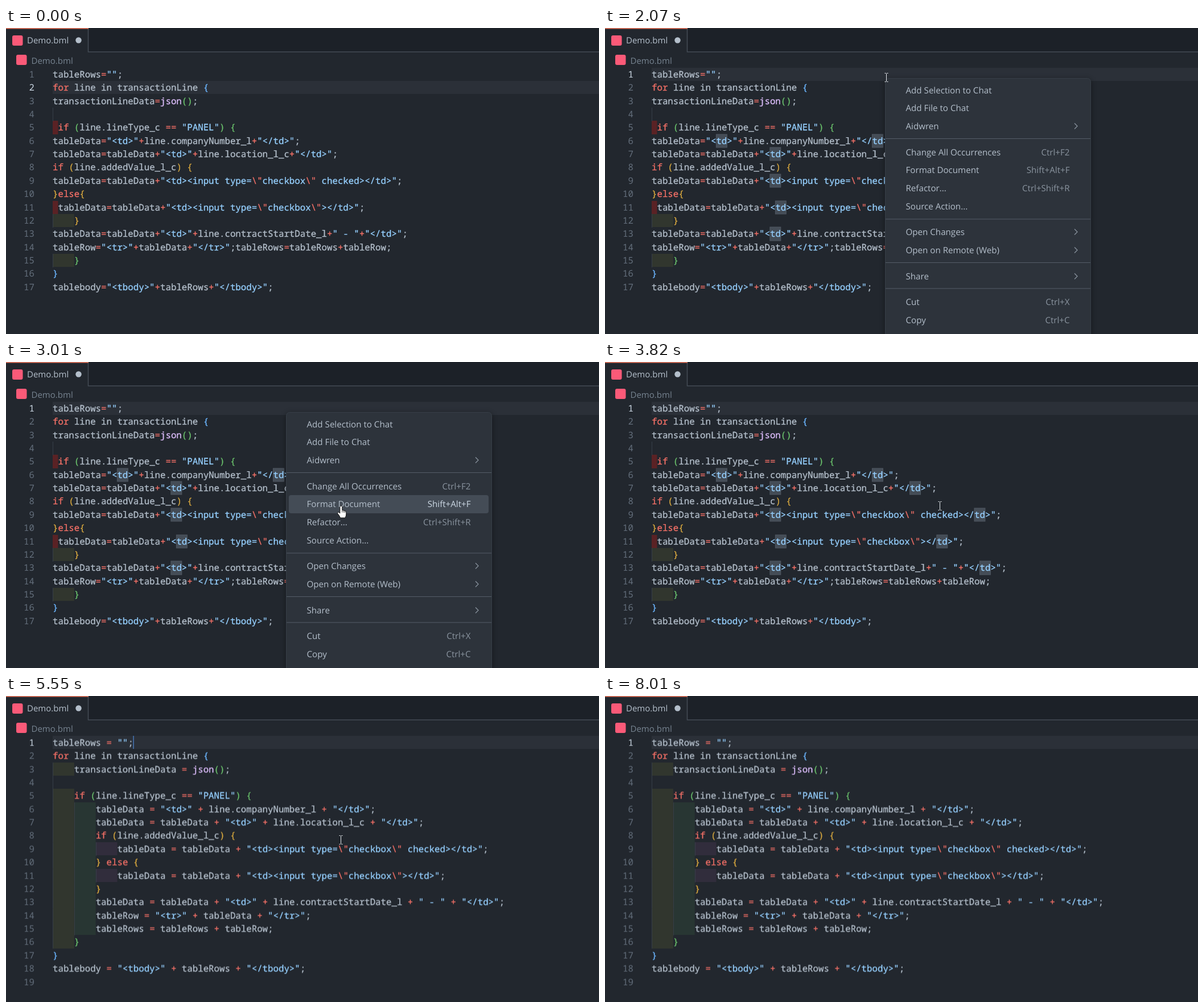
Animation, 1042 px wide and 538 px high, one loop 8.15 s. Source, as an HTML page:

```html
<!DOCTYPE html>
<html lang="en">
<head>
<meta charset="utf-8">
<title>Formatting a document</title>
<style>
html, body { margin: 0; width: 100%; height: 100%; overflow: hidden; background: #22272e; }
svg { display: block; width: 1042px; height: 538px; font: 15px "Open Sans", "Noto Sans", sans-serif; text-rendering: geometricPrecision; }
text { white-space: pre; fill: #b4bfcb; }
.code text { font: 15.75px "Noto Sans Mono", monospace; }
.code .num { fill: #636e7b; text-anchor: end; }
.code .active { fill: #cdd9e5; }
.line { color: #b4bfcb; }
.line, .line tspan { fill: currentColor; stroke: currentColor; stroke-width: .3px; }
.key { color: #f47067; }
.str { color: #96d0ff; }
.fn { color: #dcbdfb; }
.b0 { color: #6cb6ff; }
.b1 { color: #6bc46d; }
.b2 { color: #daaa3f; }
.current { fill: rgba(99,110,123,.14); }
.guide { fill: #373e47; }
.word { fill: #444c56; stroke: #505963; }
.tone0 { fill: rgba(255,255,64,.07); }
.tone1 { fill: rgba(127,255,127,.07); }
.tone2 { fill: rgba(255,127,255,.07); }
.bad { fill: rgba(128,32,32,.6); }
#menu { filter: drop-shadow(0 2px 5px rgba(0,0,0,.4)); }
#menu text { font-size: 15.15px; }
#menu .keys { fill: #8a949f; text-anchor: end; }

/* every track shares one clock; hard switches hold until the next key */
.t { animation: 8.15s step-end infinite both; }
#raw { animation-name: raw; }
#fmt { animation-name: fmt; }
#first { animation-name: first; }
#second { animation-name: second; }
#raw .n1 { animation-name: n1; }
#raw .n2 { animation-name: n2; }
#words { animation-name: words; }
#early { animation-name: early; }
#late { animation-name: late; }
#menu { animation-name: menu; }
#hover { animation-name: hover; }
#lit { animation-name: lit; }
#beam { animation-name: beam; }
#hand { animation-name: hand; }
#click { animation-name: click; }
#settle { animation-name: settle; animation-timing-function: ease-out; }
#caret { animation-name: caret; animation-timing-function: linear; }
#mouse { animation-name: mouse; animation-timing-function: linear; }

@keyframes raw { 0% { opacity: 1 } 47.67%, 100% { opacity: 0 } }
@keyframes fmt { 0% { opacity: 0 } 47.67%, 100% { opacity: 1 } }
@keyframes first { 0% { opacity: 0 } 23.8%, 100% { opacity: 1 } }
@keyframes second { 0% { opacity: 1 } 23.8%, 100% { opacity: 0 } }
@keyframes n1 { 0% { fill: #636e7b } 23.8%, 100% { fill: #cdd9e5 } }
@keyframes n2 { 0% { fill: #cdd9e5 } 23.8%, 100% { fill: #636e7b } }
@keyframes words { 0% { opacity: 0 } 24.6%, 100% { opacity: 1 } }
@keyframes early { 0% { opacity: 1 } 57.4%, 100% { opacity: 0 } }
@keyframes late { 0% { opacity: 0 } 57.4%, 100% { opacity: 1 } }
@keyframes menu { 0% { opacity: 0 } 24.6% { opacity: 1 } 46.87%, 100% { opacity: 0 } }
@keyframes hover {
  0% { opacity: 0; transform: translateY(94px) }
  29.4% { opacity: 1; transform: translateY(94px) }
  30.1% { opacity: 1; transform: translateY(125.5px) }
  30.81% { opacity: 1; transform: translateY(156.5px) }
  33.5% { opacity: 1; transform: translateY(203px) }
  35.78%, 100% { opacity: 1; transform: translateY(234px) }
}
@keyframes lit { 0% { fill: #8a949f } 35.78%, 100% { fill: #cdd9e5 } }
@keyframes beam { 0% { opacity: 0 } 1.6% { opacity: 1 } 29.4% { opacity: 0 } 46.87% { opacity: 1 } 76.1%, 100% { opacity: 0 } }
@keyframes hand { 0% { opacity: 0 } 29.4% { opacity: 1 } 46.87%, 100% { opacity: 0 } }
@keyframes click { 0% { opacity: 0 } 23.8% { opacity: 1 } 24.6% { opacity: 0 } 44.17% { opacity: 1 } 46.87%, 100% { opacity: 0 } }
@keyframes settle { 0%, 47.67% { transform: translateY(3.5px) } 49.94%, 100% { transform: none } }
@keyframes caret {
  0%, 62.2% { opacity: 1 } 64.4%, 66.9% { opacity: 0 }
  69.3%, 74.5% { opacity: 1 } 76.9%, 79.5% { opacity: 0 }
  82%, 87% { opacity: 1 } 89.3%, 91.9% { opacity: 0 }
  94.2%, 97.3% { opacity: 1 } 98.2%, 100% { opacity: 0 }
}
@keyframes mouse {
  0%, 1.6% { transform: translate(662px,496px) }
  11.41% { transform: translate(575px,160px); animation-timing-function: ease-out }
  18.9%, 29.2% { transform: translate(495px,87px) }
  31.04% { transform: translate(559px,167px) }
  33.87% { transform: translate(576px,205px); animation-timing-function: ease-out }
  36.93%, 68.5% { transform: translate(589px,253px); animation-timing-function: ease-in }
  76.1%, 100% { transform: translate(706px,546px) }
}
</style>
</head>
<body>
<svg viewBox="0 0 1042 538">
  <rect width="1042" height="538" fill="#22272e"/>
  <g id="raw" class="code t"></g>
  <g id="fmt" class="code t"><g id="settle" class="t"></g></g>

  <rect x="145" width="897" height="42" fill="#1c2128"/>
  <path d="M144.5 1V42H1042" fill="none" stroke="#444c56" stroke-width="1.5"/>
  <rect width="145" height="1.5" fill="#ec775c"/>
  <rect x="11" y="13" width="18.5" height="18" rx="3" fill="#fb5a78"/>
  <text x="37" y="27">Demo.bml</text>
  <circle cx="127.5" cy="21.5" r="5.2" fill="#b4bfcb"/>
  <rect x="18" y="47" width="18.5" height="18" rx="3" fill="#fb5a78"/>
  <text x="44.5" y="63" style="fill:#768390">Demo.bml</text>

  <g id="menu" class="t">
    <rect x="492.5" y="88.5" width="361" height="470" rx="6" fill="#2d333b" stroke="#373e47"/>
    <rect id="hover" class="t" x="497" width="351" height="32" rx="4" fill="#444c56"/>
  </g>

  <g id="mouse" class="t">
    <circle id="click" class="t" cx="-1.5" cy="-.5" r="15" fill="rgba(255,255,0,.47)"/>
    <path id="beam" class="t" d="M-3.5-7.5H-1.5L-.5-6.5L.5-7.5H2.5M-.5-6.5V6.5M-3.5 7.5H-1.5L-.5 6.5L.5 7.5H2.5" fill="none" stroke="#e6eaee"/>
    <g id="hand" class="t" stroke="#111" stroke-linejoin="round">
      <path d="M-2.2 1.2Q-.2-1.6 1.8 1.2V7.4L6.8 8.6Q8.8 9.2 8.8 11.2V14.5Q8.8 17.5 7 21H-1.5Q-3 17-6 13.8Q-7 11.8-5.6 11Q-4.2 10.6-2.2 13Z" fill="#fff"/>
      <path d="M1.8 8V11.5M4.3 8.5V11.8M6.6 9V12" fill="none" stroke-width=".8"/>
    </g>
  </g>
</svg>
<script>
const CHAR = 9.45, LEFT = 82;
const $ = id => document.getElementById(id);

function add(parent, tag, attrs, text) {
  const el = document.createElementNS("http://www.w3.org/2000/svg", tag);
  for (const k in attrs) el.setAttribute(k, attrs[k]);
  if (text !== undefined) el.textContent = text;
  return parent.appendChild(el);
}
const group = (parent, id) => add(parent, "g", { id, class: "t" });
const rowTop = row => Math.round(69.8 + 23.375 * (row - 1));
const indent = line => line.search(/\S|$/);

function block(parent, row, col, cols, cls) {
  const y = rowTop(row);
  add(parent, "rect", { x: LEFT + col * CHAR, y, width: cols * CHAR, height: rowTop(row + 1) - y, class: cls });
}

function current(parent, row) {
  add(parent, "rect", { x: LEFT, y: rowTop(row), width: 960, height: 23, class: "current" });
}

function drawCode(parent, lines) {
  let depth = 0;
  lines.forEach((line, i) => {
    const row = i + 1, y = rowTop(row) + 17;
    const levels = line ? Math.floor(indent(line) / 4) : +(row === 4);
    for (let k = 0; k < levels; k++)
      add(parent, "rect", { x: Math.round(LEFT + k * 4 * CHAR), y: rowTop(row), width: 1, height: 24, class: "guide" });
    add(parent, "text", { x: 50, y, class: "num t n" + row }, row);

    const text = add(parent, "text", { x: LEFT, y, class: "line" });
    const span = (s, cls) => add(text, "tspan", { class: cls }, s);
    const tokens = line.match(/"(?:\\.|[^"\\])*"|\b(?:for|if|else)\b|json|[=+]+|[(){}]|\w+|./g) || [];
    for (const s of tokens) {
      if (s[0] === '"') s.split(/(\\")/).forEach(p => span(p, p === '\\"' ? "key" : "str"));
      else if (/^(for|if|else|[=+]+)$/.test(s)) span(s, "key");
      else if (s === "json") span(s, "fn");
      else if (/[({]/.test(s)) span(s, "b" + depth++ % 3);
      else if (/[)}]/.test(s)) span(s, "b" + --depth % 3);
      else span(s, "plain");
    }
  });
}

const messy = String.raw`tableRows="";
for line in transactionLine {
transactionLineData=json();

 if (line.lineType_c == "PANEL") {
tableData="<td>"+line.companyNumber_l+"</td>";
tableData=tableData+"<td>"+line.location_l_c+"</td>";
if (line.addedValue_l_c) {
tableData=tableData+"<td><input type=\"checkbox\" checked></td>";
}else{
 tableData=tableData+"<td><input type=\"checkbox\"></td>";
    }
tableData=tableData+"<td>"+line.contractStartDate_l+" - "+"</td>";
tableRow="<tr>"+tableData+"</tr>";tableRows=tableRows+tableRow;
    }
}
tablebody="<tbody>"+tableRows+"</tbody>";`.split("\n");

const tidy = String.raw`tableRows = "";
for line in transactionLine {
    transactionLineData = json();

    if (line.lineType_c == "PANEL") {
        tableData = "<td>" + line.companyNumber_l + "</td>";
        tableData = tableData + "<td>" + line.location_l_c + "</td>";
        if (line.addedValue_l_c) {
            tableData = tableData + "<td><input type=\"checkbox\" checked></td>";
        } else {
            tableData = tableData + "<td><input type=\"checkbox\"></td>";
        }
        tableData = tableData + "<td>" + line.contractStartDate_l + " - " + "</td>";
        tableRow = "<tr>" + tableData + "</tr>";
        tableRows = tableRows + tableRow;
    }
}
tablebody = "<tbody>" + tableRows + "</tbody>";
`.split("\n");

// before formatting
const raw = $("raw");
current(group(raw, "first"), 1);
current(group(raw, "second"), 2);
block(raw, 5, 0, 1, "bad");
block(raw, 11, 0, 1, "bad");
block(raw, 12, 0, 4, "tone0");
block(raw, 15, 0, 4, "tone0");
const words = group(raw, "words");
messy.forEach((line, i) => {
  for (const m of line.matchAll(/td(?=>)/g)) block(words, i + 1, m.index, 2, "word");
});
drawCode(raw, messy);

// after formatting
const fmt = $("settle");
current(fmt, 1);
const early = group(fmt, "early"), late = group(fmt, "late");
block(early, 5, 0, 4, "bad");
block(early, 11, 11, 1, "bad");
block(early, 12, 4, 4, "tone0");
block(early, 16, 0, 4, "tone0");
tidy.forEach((line, i) => {
  for (let k = 0; k < indent(line) / 4; k++) block(late, i + 1, k * 4, 4, "tone" + k);
});
drawCode(fmt, tidy);
fmt.querySelector(".n1").classList.add("active");
add(fmt, "rect", { id: "caret", class: "t", x: 223, y: 70, width: 2, height: 23, fill: "#539bf5" });

// context menu: label, centre, shortcut or ">" for a submenu
const menu = $("menu");
[
  ["Add Selection to Chat", 110], ["Add File to Chat", 141], ["Aidwren", 173, ">"],
  ["Change All Occurrences", 219, "Ctrl+F2"], ["Format Document", 250, "Shift+Alt+F"],
  ["Refactor...", 282, "Ctrl+Shift+R"], ["Source Action...", 314],
  ["Open Changes", 359, ">"], ["Open on Remote (Web)", 391, ">"], ["Share", 437, ">"],
  ["Cut", 482, "Ctrl+X"], ["Copy", 514, "Ctrl+C"]
].forEach(([label, y, extra]) => {
  add(menu, "text", { x: 528.5, y: y + 5 }, label);
  if (extra === ">") add(menu, "path", { d: `M825 ${y - 5.5}l5 5-5 5`, fill: "none", stroke: "#8a949f", "stroke-width": 1.2 });
  else if (extra) {
    const keys = add(menu, "text", { x: 816.5, y: y + 5, class: "keys t" }, extra);
    if (label === "Format Document") keys.id = "lit";
  }
});
for (const y of [194.5, 336, 412.5, 458])
  add(menu, "path", { d: `M493 ${y}H853`, stroke: "#545d68" });
</script>
</body>
</html>
```
